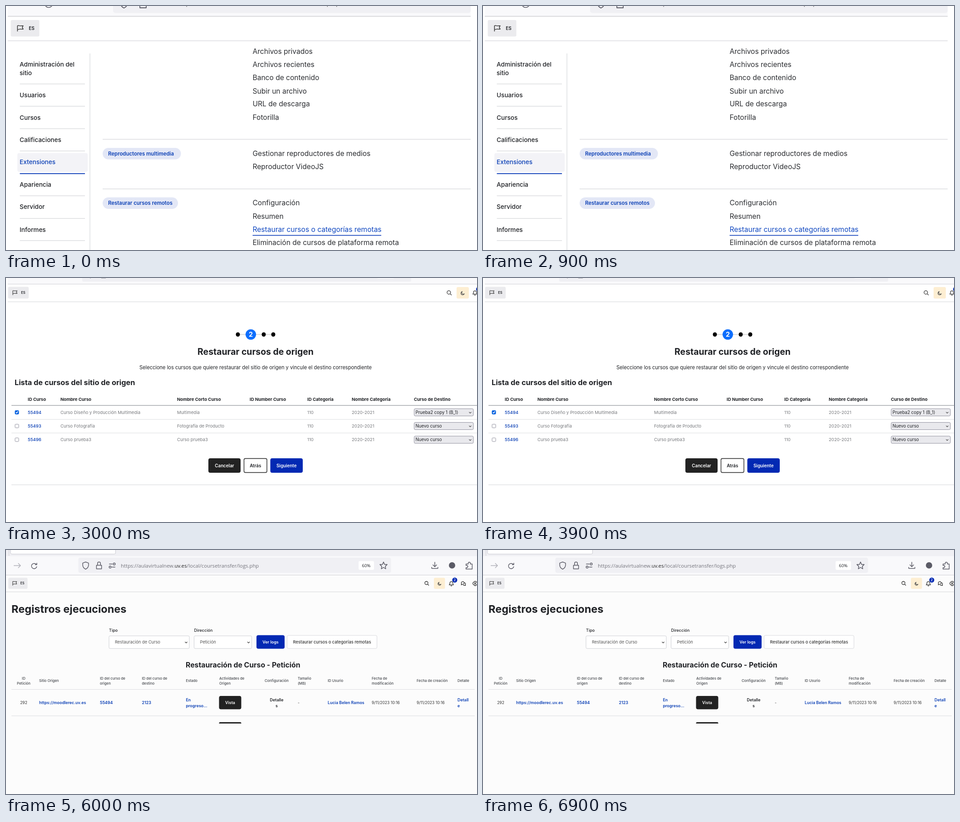
An HTML page for the animation above (7.5 s loop, 1038x540 px).

```html
<!DOCTYPE html>
<html lang="es">
<head>
<meta charset="utf-8">
<title>Restaurar cursos remotos</title>
<style>
  html, body { margin: 0; width: 100%; height: 100%; overflow: hidden; background: #fff; }
  svg { display: block; width: 100%; height: 100%; }
  text { font-family: Inter, sans-serif; white-space: pre; }
  text.url { font-family: "Open Sans", sans-serif; }
</style>
</head>
<body>
<svg id="stage" viewBox="0 0 1038 540"></svg>
<script>
const SCENE_MS = 1500;
const INK = '#1f2125', GRAY = '#77797d', BLUE = '#0a3fb5', BUTTON_BLUE = '#0229b3', STEP_BLUE = '#0d6efd';
const RULE = '#dcdde0', CHROME = '#f9f9fb', FIELD = '#f0f0f4', ICON = '#5b5b66';

// Basic shapes
const text = (x, y, s, size, { w = 400, c = INK, a = 'start', cls = '' } = {}) =>
  `<text x="${x}" y="${y}" font-size="${size}" font-weight="${w}" fill="${c}" text-anchor="${a}" class="${cls}">${s}</text>`;
const rect = (x, y, x2, y2, fill, stroke = 'none', r = 0, sw = 1) =>
  `<rect x="${x}" y="${y}" width="${x2 - x}" height="${y2 - y}" rx="${r}" fill="${fill}" stroke="${stroke}" stroke-width="${sw}"/>`;
const hline = (x, x2, y, c = RULE, sw = 1.2) =>
  `<path d="M${x} ${y}H${x2}" stroke="${c}" stroke-width="${sw}"/>`;
const circle = (x, y, r, fill, stroke = 'none', sw = 1) =>
  `<circle cx="${x}" cy="${y}" r="${r}" fill="${fill}" stroke="${stroke}" stroke-width="${sw}"/>`;

// Outline icons, centred on the origin in a 20-unit box
const ICONS = {
  flag: 'M-9 10V-8Q-6-9-3-8T3-8H9L6-3L9 3H3Q0 2-3 3T-9 3',
  search: 'M5-2A7 7 0 1 1-9-2A7 7 0 1 1 5-2M3 3L9 9',
  moon: 'M-1-8A8.5 8.5 0 1 0 9 3A7 7 0 0 1-1-8Z',
  bell: 'M-9 5Q-6 3-6-3A6 6 0 0 1 6-3Q6 3 9 5ZM-3 8Q0 11 3 8',
  chat: 'M-5 4L-9 6L-8 1A6 6 0 1 1-2 4ZM4-3A5 5 0 0 1 8 5L9 9L5 8A6 6 0 0 1-1 7',
  gear: 'M-3-9H3L4-6L8-5L10 0L8 5L4 6L3 9H-3L-4 6L-8 5L-10 0L-8-5L-4-6ZM3 0A3 3 0 1 1-3 0A3 3 0 1 1 3 0',
  shield: 'M0-10L8-7V-2Q8 6 0 10Q-8 6-8-2V-7Z',
  lock: 'M-7-1H7V9H-7ZM-4-1V-6A4 4 0 0 1 4-6V-1',
  toggles: 'M-9-4H1M9-4A3 3 0 1 1 3-4A3 3 0 1 1 9-4M-1 5H9M-3 5A3 3 0 1 1-9 5A3 3 0 1 1-3 5',
  star: 'M0-10L3-3L10-3L5 2L6 9L0 5L-6 9L-5 2L-10-3L-3-3Z',
  reload: 'M7-5A9 9 0 1 0 9 2M9-10V-4H3',
  forward: 'M-10 0H10M3-7L10 0L3 7',
  download: 'M0-10V4M-6-2L0 4L6-2M-9 5V9H9V5',
  puzzle: 'M-9-5H-3V-7A3 3 0 0 1 3-7V-5H8V9H-9V5H-7A3 3 0 0 0-7-1H-9Z',
  chevron: 'M-10-5L0 5L10-5',
  check: 'M-6 0L-2 5L7-6',
};
const icon = (name, x, y, size, c = '#333', sw = 1.3) =>
  `<path d="${ICONS[name]}" transform="translate(${x} ${y}) scale(${size / 20})" fill="none" stroke="${c}" stroke-width="${sw * 20 / size}" stroke-linejoin="round"/>`;

// Interface parts
const language = (x, y, x2, y2, size) => {
  const mid = (y + y2) / 2, w = x2 - x;
  return rect(x, y, x2, y2, '#ebebee', 'none', 3) + icon('flag', x + w * .335, mid, size * 1.4, '#333', size * .15) +
    text(x + w * .63, mid + size * .37, 'ES', size, { w: 600 });
};
const button = (x, x2, y, y2, label, size, kind) => {
  const [fill, stroke, color] = {
    dark: ['#222', '#222', '#fff'], light: ['#fff', '#222', INK],
    blue: [BUTTON_BLUE, BUTTON_BLUE, '#fff'], plain: ['#fff', '#d8d9dd', '#333'],
  }[kind];
  return rect(x, y, x2, y2, fill, stroke, 3, kind === 'light' ? 1.4 : 1) +
    text((x + x2) / 2, (y + y2) / 2 + size * .36, label, size, { w: kind === 'plain' ? 500 : 600, c: color, a: 'middle' });
};
const select = (x, x2, y, y2, label, size, { pad = 3, fill = '#fff', stroke = '#cdcfd4', c = '#555' } = {}) =>
  rect(x, y, x2, y2, fill, stroke, 2.5) + text(x + pad, (y + y2) / 2 + size * .35, label, size, { c }) +
  icon('chevron', x2 - 7, (y + y2) / 2 + .5, 5, '#444', 1.2);
const sortArrows = (x, y) =>
  `<path d="M${x - 3.2} ${y - 1}l3.2-3.5 3.2 3.5zM${x - 3.2} ${y + 1}l3.2 3.5 3.2-3.5z" fill="#333"/>`;
const steps = (xs, y, active, r, dotR) =>
  `<path d="M${xs[0]} ${y}H${xs[3]}" stroke="#777" stroke-dasharray="1 1"/>` +
  xs.map((x, i) => i === active
    ? circle(x, y, r, STEP_BLUE) + text(x, y + r * .45, i + 1, r * 1.25, { w: 700, c: '#fff', a: 'middle' })
    : `<ellipse cx="${x}" cy="${y}" rx="${dotR}" ry="${dotR * 1.08}"/>`).join('');
const help = (x, y) => circle(x, y, 5, 'none', '#333', 1.1) + text(x, y + 2.9, '?', 8, { w: 600, a: 'middle' });
const tableRow = (xs, y, cells, size, style) =>
  cells.map((s, i) => s ? text(xs[i], y, s, size, style) : '').join('');

const COURSE_HEADS = ['Nombre Curso', 'Nombre Corto Curso', 'ID Number Curso', 'ID Categoría', 'Nombre Categoría', 'Curso de Destino'];

function extensionsMenu() {
  const menu = [['Usuarios', 201.5], ['Cursos', 251.5], ['Calificaciones', 300.5], ['Extensiones', 350],
    ['Apariencia', 400], ['Servidor', 449], ['Informes', 499.5], ['Desarrollo', 549.5]];
  const links = [['Archivos privados', 106], ['Archivos recientes', 134.5], ['Banco de contenido', 164],
    ['Subir un archivo', 193.5], ['URL de descarga', 222], ['Fotorilla', 251.5],
    ['Gestionar reproductores de medios', 332], ['Reproductor VideoJS', 361], ['Configuración', 441],
    ['Resumen', 471], ['Restaurar cursos o categorías remotas', 499.5], ['Eliminación de cursos de plataforma remota', 529]];
  const badge = (x2, y, label) => rect(213, y, x2, y + 25.5, '#e3e7f6', 'none', 12.7) +
    text(225, y + 16.7, label, 11.4, { w: 600, c: BLUE });
  return rect(4, 0, 1024, 22, CHROME) + rect(236, -20, 1024, 15.5, FIELD, 'none', 5) +
    icon('reload', 94, -6, 19, ICON, 1.6) + icon('shield', 260, -6, 21, ICON, 1.8) + icon('lock', 302, -5, 20, ICON, 1.8) +
    icon('toggles', 341, -8, 18, ICON, 1.6) +
    text(374, -2, 'https://aulavirtualnew.uv.es/admin/search.php', 16.7, { c: '#777', cls: 'url' }) +
    hline(4, 1024, 22.8, '#cfcfd4', 1.6) + language(10.5, 31, 73.5, 67.5, 10) + hline(4, 1024, 77, RULE, 1.4) +
    rect(25, 325.5, 180, 367, '#f3f3f7', 'none', 4) +
    `<path d="M185 105V540" stroke="${RULE}" stroke-width="1.4"/>` +
    text(30, 133.5, 'Administración del', 13.6, { w: 500 }) + text(30, 152.5, 'sitio', 13.6, { w: 500 }) +
    menu.map(([s, y]) => text(30, y, s, 13.6, { w: 500, c: s === 'Extensiones' ? BLUE : INK })).join('') +
    [172.5, 221.7, 271.5, 320.8, 420, 470.2, 519.3].map(y => hline(30.5, 174, y, RULE, 1.5)).join('') +
    hline(30.5, 174, 371, '#1c49bd', 1.8) +
    hline(213, 1024, 295, RULE, 1.4) + hline(213, 1024, 404.7, RULE, 1.4) +
    badge(385.5, 314, 'Reproductores multimedia') + badge(379, 423.5, 'Restaurar cursos remotos') +
    links.map(([s, y]) => text(543.5, y, s, 15.55, { c: y === 499.5 ? '#0f47c0' : '#2b2d31' })).join('') +
    hline(543.5, 827, 507.7, '#1c49bd', 1.7);
}

function chooseSource() {
  const footer = (x, y, s) => text(x, y, s, 10.4, { a: 'end' });
  const label = (y, s) => text(250, y, s, 12.1, { w: 500, a: 'end' });
  return hline(0, 1038, 22.8) + steps([574, 609, 635.5, 662], 104.5, 0, 14, 5.5) +
    text(613.5, 152, 'Restaurar cursos o categorías remotas', 24.2, { w: 700, a: 'middle' }) +
    text(613.5, 191, 'Seleccione si quiere restaurar una categoría o un conjunto de cursos.', 13.8, { a: 'middle' }) +
    label(243, 'Restaurar cursos o categoría') + help(262.7, 236) +
    label(288, 'Seleccione el sitio de origen') + help(262.7, 281) +
    rect(285.5, 220.5, 390, 258, '#fff', '#cdcfd4', 3) + text(302, 243.5, 'Cursos', 12.1, { c: '#4a4d52' }) + sortArrows(377.5, 239) +
    rect(285.5, 264.5, 491.5, 303, '#fff', '#cdcfd4', 3) + text(302, 288, 'https://moodlerec.uv.es', 12.1, { c: '#4a4d52' }) + sortArrows(479, 283) +
    button(485.5, 572.5, 349.5, 388, 'Cancelar', 11.9, 'dark') + button(581.5, 644.5, 349.5, 388, 'Atrás', 11.9, 'light') +
    button(654, 742, 349.5, 388, 'Siguiente', 11.9, 'blue') + hline(0, 1038, 421.7) +
    footer(157, 458, 'Paragraph lorem ipsum dolar set...') + footer(40, 486, 'Unrad list') + footer(48, 501, 'Lorem ipsum') +
    rect(0, 498.5, 1038, 540, '#fff');
}

function chooseCourses() {
  const xs = [48, 120, 377, 537, 664, 762, 899];
  const courses = [['55494', 'Curso Diseño y Producción Multimedia', 'Multimedia', 'Prueba2 copy 1 (B_1)'],
    ['55493', 'Curso Fotografía', 'Fotografía de Producto', 'Nuevo curso'],
    ['55496', 'Curso prueba3', 'Curso prueba3', 'Nuevo curso']];
  const row = ([id, name, short, target], i) => {
    const y = 297.3 + 30.3 * i;
    return rect(20, y - 4, 28, y + 4, i ? '#fff' : '#0060df', i ? '#8f8f9d' : '#0060df', 1.5) +
      (i ? '' : icon('check', 24, y, 7, '#fff', 1.5)) +
      text(48, y + 3.4, id, 9.5, { w: 500, c: BLUE }) +
      tableRow(xs.slice(1), y + 3.4, [name, short, '', '110', '2020-2021'], 9.6, { c: GRAY }) +
      select(899.5, 1030, y - 8, y + 8, target, 9.7, { fill: '#e9e9ed', stroke: '#8f8f9d', c: INK });
  };
  return rect(4, 0, 1038, 13, CHROME) + rect(168, -12, 893, 8, FIELD, 'none', 3) + rect(818, -8, 855, 1, '#fff', 'none', 2) +
    icon('shield', 186, -7, 14, ICON) + icon('lock', 215, -6, 13, ICON) +
    hline(4, 1038, 13.5, '#d0d0d5') + language(4.5, 19.5, 50, 45.5, 7.5) + hline(4, 1038, 52.7) +
    icon('search', 977, 33, 11) + rect(993, 20, 1020, 45.5, '#fdeed2', 'none', 3) + icon('moon', 1006, 33.5, 9, '#555') +
    icon('bell', 1033.5, 33, 10.5) + circle(1042, 25, 6, BUTTON_BLUE) +
    steps([511, 539.5, 568, 589], 125, 1, 11.5, 4.5) +
    text(550, 170, 'Restaurar cursos de origen', 19.4, { w: 700, a: 'middle' }) +
    text(550, 201.5, 'Seleccione los cursos que quiere restaurar del sitio de origen y vincule el destino correspondiente', 11.05, { a: 'middle' }) +
    text(19, 237, 'Lista de cursos del sitio de origen', 16.3, { w: 700 }) +
    tableRow(xs, 271.5, ['ID Curso', ...COURSE_HEADS], 9.6, { w: 700 }) +
    hline(12, 1038, 282, '#a5a7ad', 1.3) + hline(12, 1038, 313) + hline(12, 1038, 343) +
    courses.map(row).join('') +
    button(446.5, 516.5, 399.5, 430.5, 'Cancelar', 9.8, 'dark') + button(524.5, 575, 399.5, 430.5, 'Atrás', 9.8, 'light') +
    button(583, 653.5, 399.5, 430.5, 'Siguiente', 9.8, 'blue') + hline(12, 1038, 457.7);
}

function configure() {
  const xs = [50, 331, 493.5, 631.5, 739, 888.5];
  const heading = (y, s) => text(530.3, y, s, 10.1, { w: 600, c: '#55585d', a: 'middle' });
  const option = (x, y, title, detail) => text(x, y, title, 10.15, { w: 700 }) + text(x, y + 16.6, detail, 8.7, { c: '#333' });
  const checkbox = y => rect(282, y - 4, 290, y + 4, '#fff', '#b3b5ba', 1.5);
  return text(14, 17, 'ID Curso', 10.1, { w: 700, a: 'end' }) + tableRow(xs, 17, COURSE_HEADS, 10.1, { w: 700 }) +
    hline(0, 1038, 28, '#a0a3aa', 1.3) + text(3, 47.3, '55494', 10, { c: '#5d77b5', a: 'end' }) +
    tableRow(xs, 47.3, ['Curso Diseño y Producción Multimedia', 'Multimedia', '', '110', '2020-2021'], 10.15, { c: '#6c6f74' }) +
    select(888.5, 1026, 36, 52.5, 'Prueba2 copy 1 (B_1)', 10.2, { fill: '#f6f6f8', stroke: '#c0c0c8' }) +
    text(530.3, 95, 'Configuración', 11.7, { w: 700, a: 'middle' }) + heading(115.8, 'Restaurar en este curso') +
    circle(293.3, 150.5, 4, '#fff', '#c5c7cc') + circle(293.3, 150.5, 2.5, '#a5a7ad') + circle(293.3, 197.7, 4, '#fff', '#b3b5ba') +
    option(332.5, 149.3, 'Fusionar la copia de seguridad con este curso', 'Las actividades del curso de origen se fusionaran en el curso de destino') +
    option(332.5, 197.2, 'Borrar el contenido del curso actual y después restaurar', 'Todo el contenido del curso de destino se borrará y se restaurará con el curso de origen') +
    heading(255.8, 'Borrar en destino') + checkbox(287.7) + checkbox(335.7) +
    option(319, 290.3, 'Eliminar grupos y agrupamientos en el curso de destino', 'Se borrarán los grupos y agrupamientos actuales del curso de destino ya existentes') +
    option(319, 337.4, 'Eliminar roles y matrículaciones en el curso de destino', 'Se borrarán las matriculaciones y roles actuales del curso de destino ya existentes') +
    heading(396, 'Configuración del curso de origen') + checkbox(428.7) +
    option(319, 430.5, 'Restaurar curso con datos de usuarios de origen', 'El curso se restaurará con los datos de usuarios que existen en el curso de origen') +
    button(392, 465.5, 485.5, 518, 'Cancelar', 10.2, 'dark') + button(473.5, 527.5, 485.5, 518, 'Atrás', 10.2, 'light') +
    button(535, 668.5, 485.5, 518, 'Ejecutar restauración', 10.2, 'blue') +
    `<linearGradient id="shade"><stop stop-color="#fff"/><stop offset="1" stop-color="#ececec"/></linearGradient>` +
    `<path d="M1019 519Q1021 490 1038 481V519Z" fill="url(#shade)"/>` + rect(1036.5, 493, 1038, 519, '#bbb');
}

function logs() {
  const heads = [[39, 'ID|Petición', 'middle'], [73, 'Sitio Origen'], [207, 'ID del curso de|origen'], [299.5, 'ID del curso de|destino'],
    [396.5, 'Estado'], [470, 'Actividades de|Origen'], [596.5, 'Configuración', 'middle'], [643, 'Tamaño|(MB)'],
    [709, 'ID Usurio'], [806, 'Fecha de|modificación'], [905, 'Fecha de creación'], [995, 'Detalle']];
  const cells = [[39, '292', 0, 'middle'], [73, 'https://moodlerec.uv.es', 1], [207, '55494', 1], [299.5, '2123', 1],
    [396.5, 'En|progreso...', 1], [596.5, 'Detalle|s', 2, 'middle'], [643, '-', 0], [709, 'Lucia Belen Ramos', 1],
    [806, '9/11/2023 10:16', 0], [905, '9/11/2023 10:16', 0], [995, 'Detall|e', 1]];
  const lines = (x, mid, s, step, size, style) => s.split('|').map((part, i, all) =>
    text(x, mid + (i - (all.length - 1) / 2) * step, part, size, style)).join('');
  const cellStyles = [{ w: 400, c: '#333' }, { w: 600, c: BLUE }, { w: 600, c: INK }];
  return rect(0, 0, 1038, 540, '#fcfcfc') + rect(0, 0, 1038, 14, FIELD) + rect(10, -10, 241.5, 9, '#fff', '#c9c9d0', 3) +
    rect(6, 0, 7, 13, '#d0d0d6') + rect(0, 13.5, 1038, 55, CHROME) +
    icon('forward', 24.5, 34.5, 15, '#b0b0b7', 1.4) + icon('reload', 62, 35, 13, ICON, 1.5) +
    rect(159.5, 17, 848.5, 50.5, FIELD, 'none', 4) + icon('shield', 175.5, 34.5, 16, ICON, 1.5) +
    icon('lock', 205, 34.5, 16, ICON, 1.5) + icon('toggles', 234, 34, 15, ICON, 1.5) +
    text(253, 38.7, 'https://aulavirtualnew.<tspan fill="#222">uv.es</tspan>/local/coursetransfer/logs.php', 11.3, { c: '#74747c', cls: 'url' }) +
    rect(777, 24.5, 811, 44, '#fff', 'none', 3) + text(794, 38, '60%', 9.6, { a: 'middle', cls: 'url' }) +
    icon('star', 832, 34.5, 16, ICON, 1.5) + icon('download', 945, 34, 15, ICON, 1.5) + circle(983, 34, 7, ICON) +
    icon('puzzle', 1021, 35, 16, ICON, 1.5) + hline(0, 1038, 55.5, '#d0d0d5') +
    language(5, 61.5, 47.5, 86, 7) + icon('search', 927.5, 74, 10) + rect(943, 61.5, 967.5, 86, '#fdeed2', 'none', 3) +
    icon('moon', 955, 74.5, 8, '#555') + icon('bell', 981.5, 74.5, 10.5) + circle(989, 66.5, 5.5, BUTTON_BLUE) +
    text(989, 69, '2', 7, { w: 600, c: '#fff', a: 'middle' }) + icon('chat', 1008, 74, 10.5) + icon('gear', 1034, 74, 10.5) +
    hline(0, 1038, 92.7) + text(12, 139, 'Registros ejecuciones', 23.5, { w: 700 }) +
    text(227, 180.5, 'Tipo', 9, { w: 500 }) + text(414.5, 180.5, 'Dirección', 9, { w: 500 }) +
    select(227, 404, 190, 218, 'Restauración de Curso', 9.3, { pad: 13 }) + select(414.5, 541.5, 190, 218, 'Petición', 9.3, { pad: 13 }) +
    button(552.5, 613.5, 189, 218, 'Ver logs', 9, 'blue') +
    button(619.5, 817.5, 189, 218, 'Restaurar cursos o categorías remotas', 9.3, 'plain') +
    text(522.3, 259.5, 'Restauración de Curso - Petición', 15.8, { w: 700, a: 'middle' }) +
    heads.map(([x, s, a]) => lines(x, 292.3, s, 11.5, 7.8, { w: 500, c: '#44474c', a })).join('') +
    hline(12, 1033, 308.5) + hline(12, 1033, 367) +
    cells.map(([x, s, kind, a]) => lines(x, 341, s, 13, kind ? 8.9 : 8.5, { ...cellStyles[kind], a })).join('') +
    button(470, 518, 323.5, 352, 'Vista', 8.9, 'dark') +
    `<path d="M469.5 384V383Q469.5 381 472 381H516Q518.5 381 518.5 383V384Z" fill="#222"/>`;
}

const stage = document.getElementById('stage');
stage.innerHTML = [extensionsMenu, chooseSource, chooseCourses, configure, logs].map(draw => `<g>${draw()}</g>`).join('');
const scenes = [...stage.children];

function play() {
  const current = Math.floor(performance.now() / SCENE_MS) % scenes.length;
  scenes.forEach((scene, i) => scene.style.display = i === current ? '' : 'none');
  requestAnimationFrame(play);
}
play();
</script>
</body>
</html>
```
